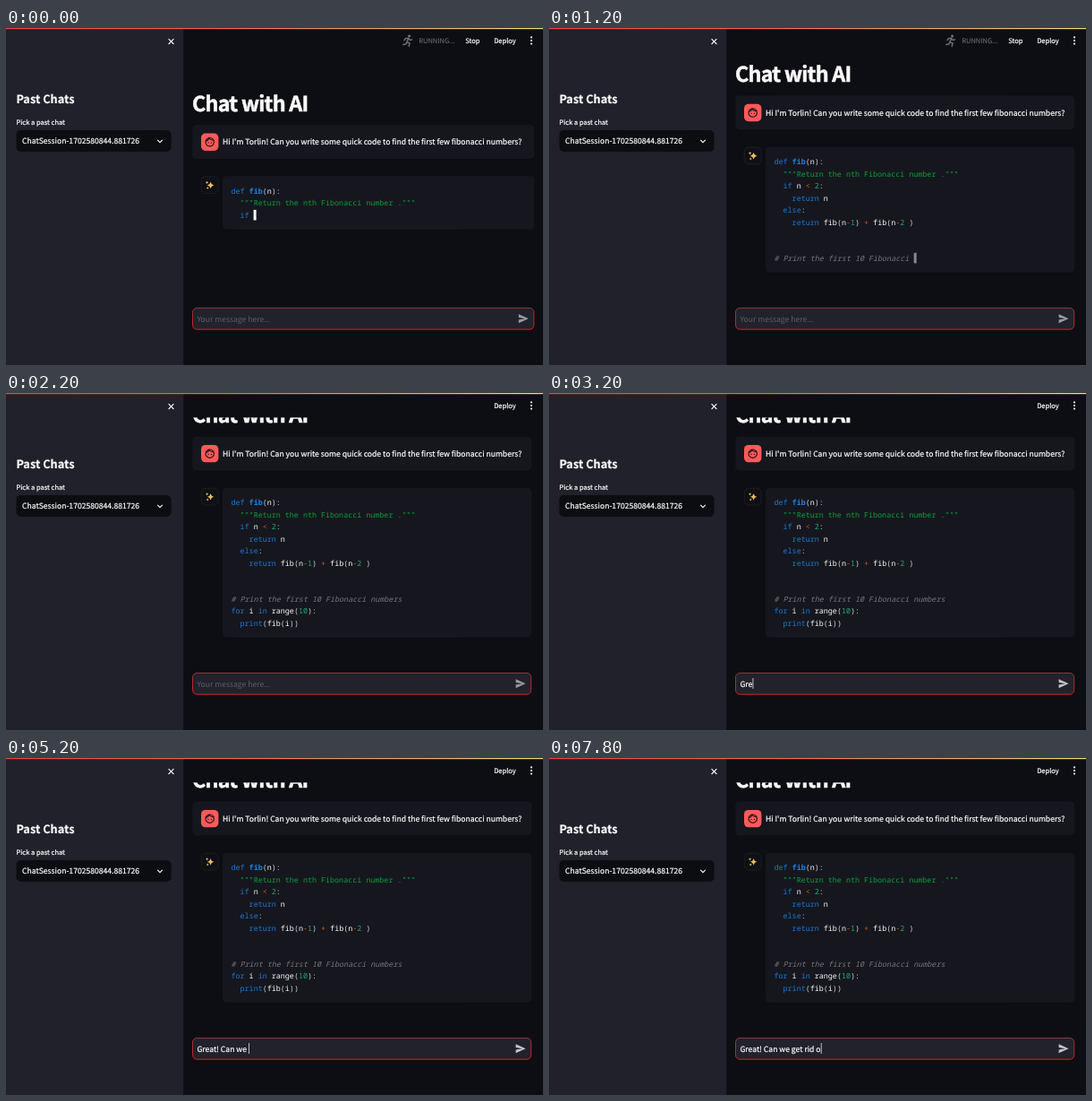
Animation, 600 px wide and 376 px high, one loop 8 s. Source, as an HTML page:

```html
<!DOCTYPE html>
<html lang="en">
<head>
<meta charset="utf-8">
<title>Chat with AI</title>
<style>
  html, body { margin: 0; width: 100%; height: 100%; overflow: hidden; background: #0d0e13; }
  svg { display: block; }
  text {
    font: 8.6px "Noto Sans CJK SC", "Noto Sans CJK JP", "Open Sans", sans-serif;
    fill: #fafafa; white-space: pre; text-rendering: geometricPrecision;
  }
  .strong { stroke: #fafafa; stroke-width: .22; }
  .title { font-size: 23.3px; font-weight: 700; letter-spacing: -.032em; stroke: #fafafa; stroke-width: .55; }
  .heading { font-size: 12.75px; font-weight: 600; }
  .small { font-size: 7.52px; }
  .muted { fill: #77787e; }
  .main { fill: #0d0e13; }
  .block { fill: #16171e; }
  .line { fill: none; stroke: #fafafa; stroke-width: 1.1; }
  .code { font: 500 8.4px "Noto Sans Mono", "Liberation Mono", monospace; }
  .keyword { fill: #1c78d6; }
  .name { fill: #1c83e1; font-weight: 700; }
  .string { fill: #0ba03a; }
  .number { fill: #1fa872; }
  .operator { fill: #d2571c; }
  .bracket { fill: #cfd0d4; }
  .comment { fill: #74767e; font-style: italic; }
</style>
</head>
<body>
<svg width="600" height="376" viewBox="0 0 600 376">
  <defs>
    <linearGradient id="rainbow">
      <stop stop-color="#f5403c"/><stop offset=".4" stop-color="#f0684a"/>
      <stop offset="1" stop-color="#f3dd70"/>
    </linearGradient>
    <linearGradient id="focus" x2="0" y2="1">
      <stop stop-color="#8a3a3e"/><stop offset=".3" stop-color="#b3272a"/>
      <stop offset="1" stop-color="#d9201c"/>
    </linearGradient>
    <path id="star" d="M0-1Q.18-.18 1 0Q.18.18 0 1Q-.18.18-1 0Q-.18-.18 0-1Z"/>
  </defs>
  <rect class="main" width="600" height="376"/>

  <g id="page">
    <text class="title" x="208" y="92.8">Chat with AI</text>
    <rect class="block fluid" x="208.3" y="108" height="38" rx="4.8"/>
    <rect x="218" y="117.5" width="19.4" height="19.4" rx="4.8" fill="#ff5a5a"/>
    <g fill="none" stroke="#1b1218" stroke-width="1.1">
      <circle cx="227.7" cy="127.2" r="4.7"/>
      <path d="M223.2 126.2Q226 125.6 226.9 123Q228.7 125.6 232.2 125.2"/>
    </g>
    <circle cx="226" cy="128" r=".7" fill="#1b1218"/>
    <circle cx="229.4" cy="128" r=".7" fill="#1b1218"/>
    <text class="strong" x="242" y="130.4">Hi I'm Torlin! Can you write some quick code to find the first few fibonacci numbers?</text>

    <rect x="218.3" y="165.8" width="18.8" height="18.8" rx="4.8" fill="#0f1015" stroke="#23242c" stroke-width=".7"/>
    <g fill="#edbd62">
      <use href="#star" transform="translate(228.6 175.4) scale(3.7)"/>
      <use href="#star" transform="translate(224.6 172.4) scale(1.7)"/>
      <use href="#star" transform="translate(225.2 178.6) scale(1.5)"/>
    </g>
    <rect id="codeBox" class="block fluid" x="242" y="165.2" rx="4.8"/>
    <g id="code"></g>
    <rect id="block" width="3" height="11.6"/>
  </g>

  <rect class="main" x="198" width="402" height="27.4"/>
  <g id="status">
    <g fill="none" stroke="#6f7076" stroke-width="1.5" stroke-linecap="round" stroke-linejoin="round">
      <path id="runner"/>
    </g>
    <circle cx="450.6" cy="9" r="1.6" fill="#6f7076"/>
    <text class="small muted" x="461.2" y="16.8">RUNNING...</text>
    <text class="small strong" x="513.3" y="16.6">Stop</text>
  </g>
  <text class="small strong" x="545.2" y="16.8">Deploy</text>
  <g fill="#fafafa">
    <circle cx="587" cy="10.4" r="1.1"/><circle cx="587" cy="14" r="1.1"/><circle cx="587" cy="17.6" r="1.1"/>
  </g>

  <rect id="field" class="fluid" x="208.5" y="312.4" height="23.8" rx="4.8" fill="#21222b" stroke="url(#focus)"/>
  <text id="message" x="213.4" y="327.5"></text>
  <rect id="caret" y="318" width=".8" height="12" fill="#e6e6e8"/>
  <path id="send" d="M0-5L11 0L0 5V1.3L7 0L0-1.3Z"/>

  <rect width="198.3" height="376" fill="#20212a"/>
  <path class="line" d="M181.6 12.2l5.8 5.8m0-5.8l-5.8 5.8"/>
  <text class="heading strong" x="11.4" y="84.1">Past Chats</text>
  <text class="small strong" x="11.5" y="107.6">Pick a past chat</text>
  <rect x="11.5" y="114" width="173" height="24" rx="4.8" fill="#0c0d11"/>
  <text class="strong" x="18" y="129.4">ChatSession-1702580844.881726</text>
  <path class="line" d="M169.2 124.8l2.8 2.8l2.8-2.8"/>
  <rect width="600" height="1.2" fill="url(#rainbow)"/>
</svg>

<script>
const LOOP = 8000, STEP = 200, LINE = 13.44, CHAR = 5.04, CODE_X = 251.5;
const $ = id => document.getElementById(id);

const source = `def fib(n):
  """Return the nth Fibonacci number ."""
  if n < 2:
    return n
  else:
    return fib(n-1) + fib(n-2 )


# Print the first 10 Fibonacci numbers
for i in range(10):
  print(fib(i))`;
const words = source.match(/\s*\S+/g);

// [time, number of words streamed]
const stream = [[0, 9], [200, 11], [400, 13], [600, 15], [800, 17], [1000, 21],
  [1200, 26], [1400, 28], [1600, 30], [1800, 32]];
const STREAM_END = 2000, RUN_END = 2200;

// [time, typed text]
const typing = [[0, ''], [3000, 'G'], [3200, 'Gre'], [3400, 'Great'], [3600, 'Great!'],
  [4000, 'Great! C'], [4200, 'Great! Ca'], [4400, 'Great! Can '], [4600, 'Great! Can w'],
  [4800, 'Great! Can we'], [5200, 'Great! Can we '], [5400, 'Great! Can we g'],
  [5600, 'Great! Can we ge'], [5800, 'Great! Can we get'], [6800, 'Great! Can we get '],
  [7000, 'Great! Can we get r'], [7200, 'Great! Can we get ri'], [7400, 'Great! Can we get rid'],
  [7600, 'Great! Can we get rid '], [7800, 'Great! Can we get rid o']];

// [time, caret visible]
const blink = [[0, false], [600, true], [1200, false], [1600, true], [2200, false],
  [2600, true], [6200, false], [6800, true]];

const poses = [
  'M449.6 11.4L448 15.6L451 17L450.2 20.4M448 15.6L446.6 18L443.8 18.4M445 13.6L446.6 11.4L449.6 11.4L451.4 13.4L453.6 13',
  'M449.2 11.4L448.2 15.6L450.8 17.4L452 20.4M448.2 15.6L447 18.2L445.6 20.6M444.6 12.6L446.8 11.6L449.2 11.4L451 13.8L453 14.2'
];

const at = (table, t) => table.filter(row => row[0] <= t).pop()[1];

const tokenPattern = /(#.*)|(""".*)|\b(def|if|return|else|for|in|print)\b|(\d+)|([<+-])|([():]+)/g;
const kinds = ['comment', 'string', 'keyword', 'number', 'operator', 'bracket'];
const escapeText = s => s.replace(/</g, '&lt;');
const span = (kind, s) => `<tspan class="${kind}">${escapeText(s)}</tspan>`;

function highlight(line) {
  let html = '', last = 0;
  const plain = s => line.startsWith('def') && s === ' fib' ? ' ' + span('name', 'fib') : escapeText(s);
  for (const match of line.matchAll(tokenPattern)) {
    html += plain(line.slice(last, match.index));
    html += span(kinds[match.slice(1).findIndex(Boolean)], match[0]);
    last = match.index + match[0].length;
  }
  return html + plain(line.slice(last));
}

function drawCode(t) {
  const lines = words.slice(0, at(stream, t)).join('').split('\n');
  const height = lines.length * LINE + 19.2;
  const scroll = Math.max(0, 165.2 + height - 272.7);
  const row = i => 185 + i * LINE;
  $('code').innerHTML = lines.map((line, i) =>
    `<text class="code" x="${CODE_X}" y="${row(i)}">${highlight(line)}</text>`).join('');
  $('codeBox').setAttribute('height', height);
  $('page').setAttribute('transform', `translate(0 ${-scroll})`);

  const tail = lines[lines.length - 1];
  const block = $('block');
  block.setAttribute('x', CODE_X + (tail.length + 1) * CHAR - .1);
  block.setAttribute('y', row(lines.length - 1) - 9);
  block.setAttribute('fill', tail.startsWith('#') ? '#85878e' : '#fafafa');
  block.style.display = t < STREAM_END ? '' : 'none';
  return scroll > 0 ? 587.2 : 590.4;
}

function drawInput(t, right) {
  const typed = at(typing, t), message = $('message');
  message.textContent = typed || 'Your message here...';
  message.style.fill = typed ? '#fafafa' : '#5d5e67';
  message.classList.toggle('strong', typed !== '');
  $('caret').setAttribute('x', 213.6 + (typed ? message.getComputedTextLength() : 0));
  $('caret').style.display = at(blink, t) ? '' : 'none';
  $('send').setAttribute('transform', `translate(${right - 17.6} 324.2)`);
  $('send').setAttribute('fill', typed ? '#c3c4c8' : '#9a9ba1');
}

function draw(t) {
  const right = drawCode(t);
  document.querySelectorAll('.fluid').forEach(el =>
    el.setAttribute('width', right - el.getAttribute('x') - (el.id === 'field' ? .5 : 0)));
  drawInput(t, right);
  $('status').style.display = t < RUN_END ? '' : 'none';
  $('runner').setAttribute('d', poses[Math.floor(t / 400) % 4 === 2 ? 1 : 0]);
}

let shown = -1;
function tick() {
  const step = Math.floor(performance.now() % LOOP / STEP);
  if (step !== shown) draw((shown = step) * STEP);
  requestAnimationFrame(tick);
}
tick();
</script>
</body>
</html>
```
